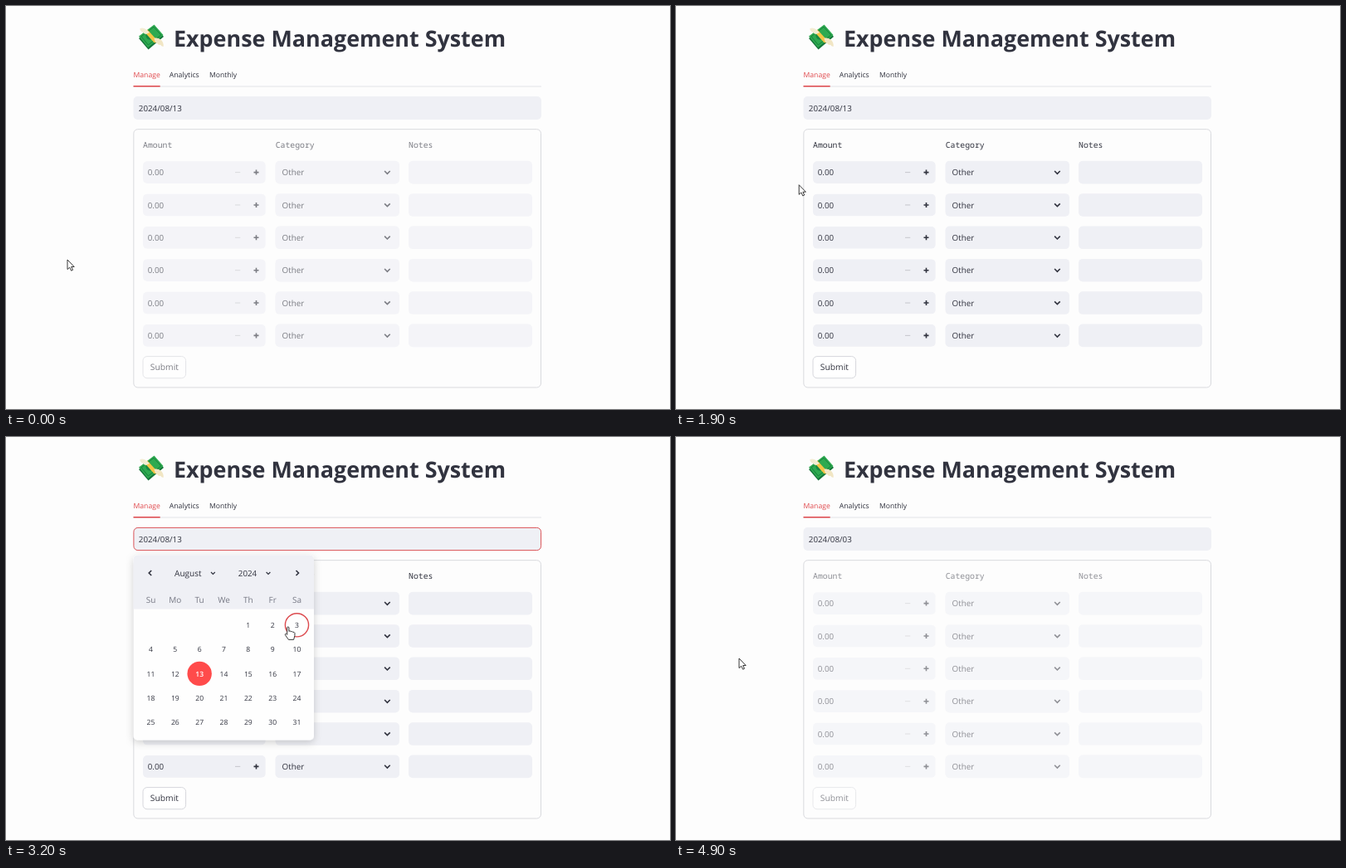
An HTML page that plays this animation: 800 px wide and 486 px high, repeating every 5 s.

```html
<!DOCTYPE html>
<html lang="en">
<head>
<meta charset="utf-8">
<title>Expense Management System</title>
<style>
html, body { margin: 0; width: 100%; height: 100%; overflow: hidden; background: #fdfdfd; }
svg { display: block; width: 100%; height: 100%; }
text { font-family: "Open Sans", "Noto Sans", sans-serif; fill: #31333f; text-rendering: geometricPrecision; white-space: pre; }
.mono { font-family: "Noto Sans Mono", "DejaVu Sans Mono", monospace; }
.mid { text-anchor: middle; }
.line { fill: none; stroke: #31333f; stroke-width: 1.6; }
</style>
</head>
<body>
<svg id="stage" viewBox="0 0 800 486" xmlns="http://www.w3.org/2000/svg">
  <defs>
    <filter id="shadow" x="-20%" y="-20%" width="140%" height="140%">
      <feDropShadow dx="0" dy="3" stdDeviation="5" flood-color="#000" flood-opacity=".18"/>
    </filter>
    <clipPath id="round"><rect x="153.5" y="142.5" width="217.5" height="223" rx="5"/></clipPath>
  </defs>
  <rect width="800" height="486" fill="#fdfdfd"/>
  <g id="money">
    <path d="M160 39L179 23.5L190 37L171.5 52.5Z" fill="#16753a"/>
    <path d="M160 36.5L178.5 22.5L189.5 35L171 50Z" fill="#2eaa50"/>
    <path d="M163 36.8L178 25.2L186.8 35L171.3 47Z" fill="none" stroke="#14813c"/>
    <ellipse cx="172.5" cy="36.5" rx="4.6" ry="3.6" transform="rotate(48 172.5 36.5)" fill="#178743"/>
    <path d="M166.8 31.2L170.4 28.5L182 41.2L181.6 44.3L178.5 44.3Z" fill="#f6c445"/>
    <path d="M161.3 27.2Q165 25.6 169 28.2L173 32L168.6 34Q165.7 33.6 165.4 31.7Q161.8 31 161.3 27.2Z" fill="#f3ecd2"/>
    <path d="M178.5 38.8Q184 37.6 187 41Q190.2 44 189.6 49Q186.9 48.7 186.2 46.8Q183.3 47.3 182.2 45Q179 44 178.5 38.8Z" fill="#f1e6c4"/>
  </g>
  <g id="page"></g>
  <g id="form"></g>
  <g id="calendar"></g>
  <g id="pointer">
    <path id="arrow" d="M0 0V11.6L2.7 9.2L4.6 13.2L6.5 12.3L4.7 8.5H8.2Z" fill="#fff" stroke="#222" stroke-width=".9"/>
    <path id="beam" d="M-2.5-5.5H-.7L0-5L.7-5.5H2.5M0-5V5M-2.5 5.5H-.7L0 5L.7 5.5H2.5" fill="none" stroke="#222"/>
    <path id="hand" d="M-.9 .6Q.2-.8 1.3 .6V5.4L2.2 4.9Q3.4 4.8 3.8 5.8Q5.2 5.1 6 6.3Q7.6 5.9 8.3 7.3V10.5L7 15.4H.8L-3.2 9.8Q-3.6 8.2-2.2 8.2L-.9 9.3Z" fill="#fff" stroke="#222" stroke-width=".9"/>
  </g>
</svg>
<script>
const $ = id => document.getElementById(id);
const LOOP = 5000, FILL = '#eff0f5', RED = '#ff4b4b';

const text = (x, y, size, str, extra = '') =>
  `<text x="${x}" y="${y}" font-size="${size}" ${extra}>${str}</text>`;
const box = (x, y, w, h, extra = `fill="${FILL}"`) =>
  `<rect x="${x}" y="${y}" width="${w}" height="${h}" rx="5" ${extra}/>`;
const chevron = (x, y, s, turn = 0, width = 1.6) =>
  `<path class="line" d="M${-s} ${-s / 2}L0 ${s / 2}L${s} ${-s / 2}" style="stroke-width:${width}" transform="translate(${x} ${y}) rotate(${turn})"/>`;

function buildPage() {
  $('page').innerHTML =
    text(202, 49, 26.9, 'Expense Management System', 'font-weight="700"') +
    text(153.5, 86.2, 8.65, 'Manage', 'style="fill:#e0484c"') +
    text(196.7, 86.2, 8.75, 'Analytics') +
    text(245, 86.2, 8.65, 'Monthly') +
    `<path d="M153.5 97H645" stroke="#e2e3e8"/>
     <path d="M153.5 96.7H185.7" stroke="#e0484c" stroke-width="1.5"/>` +
    box(153.5, 109, 491.5, 28) +
    box(153.9, 109.4, 490.7, 27.2, 'id="focus" fill="none" stroke="#dc5357"') +
    text(159.8, 127.2, 9.8, '', 'id="date"') +
    '<path id="caret" d="M212.3 118V129.5" stroke="#31333f"/>' +
    box(153.8, 148.7, 490.7, 311.3, 'fill="none" stroke="#d9dade"');
}

function buildForm() {
  let out = [['Amount', 165], ['Category', 324.7], ['Notes', 485]]
    .map(([s, x]) => text(x, 170.6, 9.8, s, 'class="mono"')).join('');
  for (let i = 0; i < 6; i++) {
    const y = 200.6 + i * 39.36;
    out += box(165, y - 13.3, 147.7, 26.6) + box(324.5, y - 13.8, 149.5, 27.6) + box(485, y - 13.8, 149, 27.6) +
      text(170.7, y + 3.8, 9.8, '0.00') + text(332.6, y + 3.8, 9.85, 'Other') +
      `<path d="M276 ${y}H282.3" stroke="#c9cad0" stroke-width="1.1"/>
       <path id="plus${i}" class="line" d="M298.5 ${y}H304.5M301.5 ${y - 3}V${y + 3}"/>` +
      chevron(459.4, y, 3.3);
  }
  out += box(165, 422.6, 51.6, 26.2, 'fill="#fff" stroke="#d6d7dc"') + text(173.8, 439.2, 10.3, 'Submit');
  $('form').innerHTML = out;
}

function buildCalendar() {
  const colX = c => 174.5 + c * 29.33, rowY = r => 226.8 + r * 29.3;
  let out = box(153.5, 142.5, 217.5, 223, 'fill="#fefefe" filter="url(#shadow)"') +
    `<rect x="153" y="142" width="219" height="65.5" fill="${FILL}" clip-path="url(#round)"/>` +
    chevron(173.7, 164, 3, 90) + chevron(351, 164, 3, -90) +
    chevron(249.4, 164.2, 2.4, 0, 1.2) + chevron(316, 164.2, 2.4, 0, 1.2) +
    text(203, 167.6, 10.1, 'August') + text(279.8, 167.6, 9.8, '2024');
  ['Su', 'Mo', 'Tu', 'We', 'Th', 'Fr', 'Sa'].forEach((s, c) => {
    out += text(colX(c), 200.4, 10, s, 'class="mid" style="fill:#777985"');
  });
  out += `<circle cx="${colX(2)}" cy="${rowY(2)}" r="14.7" fill="${RED}"/>
    <circle id="ring" cx="${colX(6)}" cy="${rowY(0)}" r="14.1" fill="none" stroke="#dc4a4e" stroke-width="1.4"/>`;
  for (let d = 1; d <= 31; d++) {
    const n = d + 3, picked = d === 13;
    out += text(colX(n % 7), rowY(Math.floor(n / 7)) + 3.1, 8.6, d,
      `class="mid"${picked ? ' font-weight="600" style="fill:#fff"' : ''}`);
  }
  $('calendar').innerHTML = out;
}

const clamp = v => Math.max(0, Math.min(1, v));
const part = (t, from, to) => clamp((t - from) / (to - from));
const smooth = p => p * p * (3 - 2 * p);
const show = (id, on) => $(id).setAttribute('visibility', on ? 'visible' : 'hidden');

// Stops of the pointer: time, x, y
const stops = [
  [0, 74, 306], [1650, 74, 306], [2150, 221.5, 126.5], [2330, 221.5, 126.5],
  [2650, 280, 180.5], [2780, 280, 180.5], [3250, 341.5, 230.5], [3690, 341.5, 230.5],
  [3840, 300, 238], [4060, 77.5, 267], [4300, 77.5, 267], [4600, 76, 267], [5000, 76, 267]
];

function pointerAt(t) {
  const i = stops.findIndex((s, k) => k && t <= s[0]);
  const [t0, x0, y0] = stops[i - 1], [t1, x1, y1] = stops[i];
  const p = smooth(part(t, t0, t1));
  return [x0 + (x1 - x0) * p, y0 + (y1 - y0) * p];
}

// Stale content fades slowly and returns at once
const fade = (t, start) => 1 - 0.67 * part(t, start, start + 1000) ** 1.7;
const formOpacity = t => t < 900 ? fade(t, -700) : fade(t, 4100);

function draw(t) {
  const [x, y] = pointerAt(t);
  $('pointer').setAttribute('transform', `translate(${x} ${y})`);
  const beam = t < 2500 && x > 154 && y < 137;
  const hand = t > 3130 && t < 3760;
  show('beam', beam);
  show('hand', hand);
  show('arrow', !beam && !hand);

  $('form').setAttribute('opacity', formOpacity(t));
  $('plus1').setAttribute('opacity', t > 3830 && t < 4180 ? 0.6 : 1);

  $('date').textContent = t < 3700 ? '2024/08/13' : '2024/08/03';
  $('focus').setAttribute('opacity', t < 3500 ? part(t, 2200, 2400) : 1 - part(t, 3500, 3590));
  show('caret', t >= 2200 && t < 3500 && Math.floor((t - 2200) / 530) % 2 === 0);

  const open = part(t, 2230, 2430), close = part(t, 3690, 3890);
  $('calendar').setAttribute('opacity', open * (1 - close));
  $('calendar').setAttribute('transform', `translate(0 ${-8 * (1 - smooth(open) + smooth(close))})`);
  show('ring', t > 3180);
}

buildPage();
buildForm();
buildCalendar();
const begin = performance.now();
function tick() {
  draw((performance.now() - begin) % LOOP);
  requestAnimationFrame(tick);
}
tick();
</script>
</body>
</html>
```
